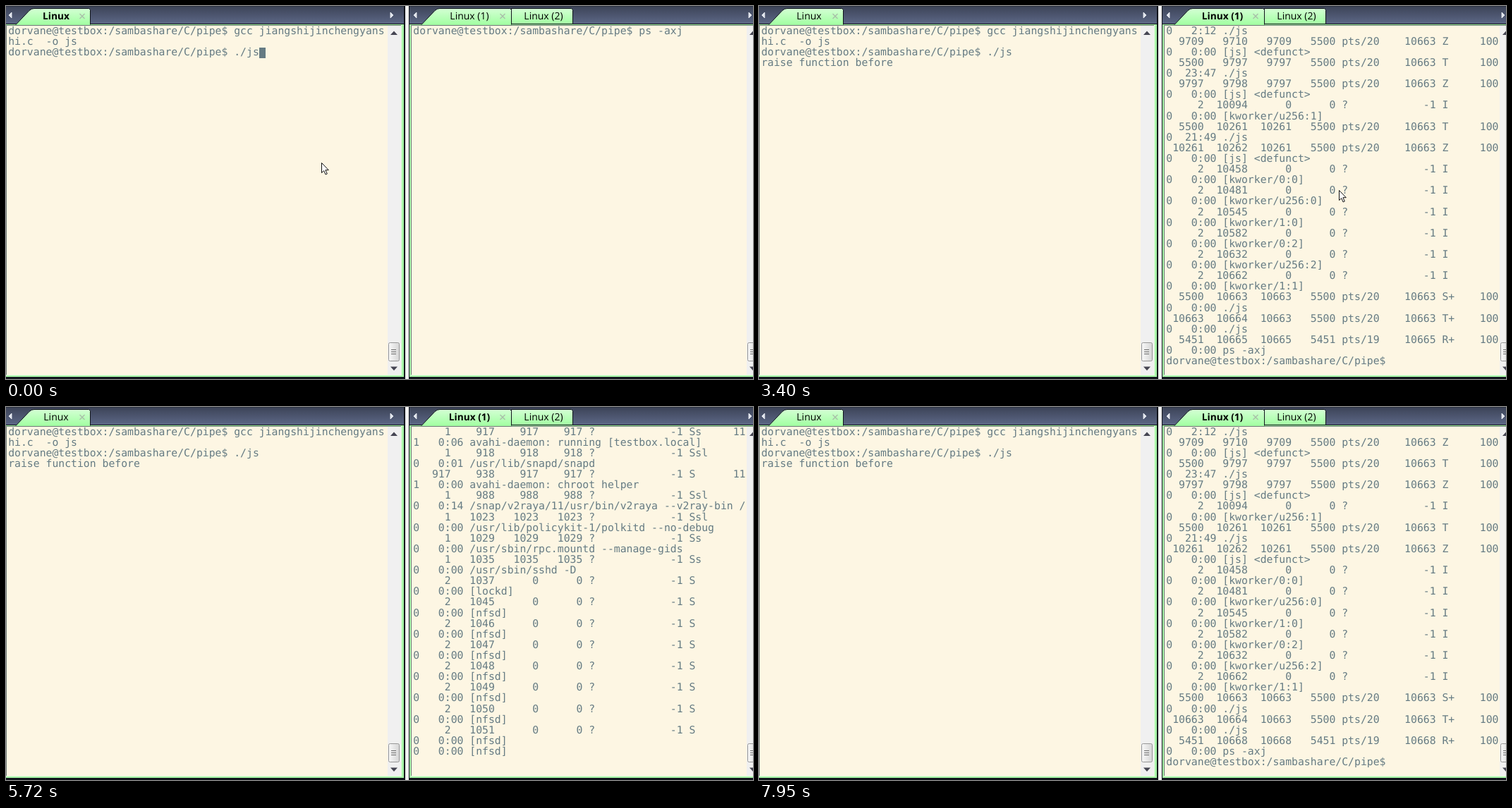
Animation of 1059 by 529 pixels, one loop 8 s. Source, as an HTML page:

```html
<!DOCTYPE html>
<html lang="en">
<head>
<meta charset="utf-8">
<title>Two terminals</title>
<style>
  html, body { margin: 0; width: 1059px; height: 529px; overflow: hidden; background: #f0f0f0; }
  body { position: relative; }
  svg, pre, #caret { position: absolute; margin: 0; }
  svg { left: 0; top: 0; }
  pre {
    top: 27.7px; color: #657b83; white-space: pre;
    font: 14.78px/15.11px "DejaVu Sans Mono", monospace;
    font-variant-ligatures: none; text-rendering: geometricPrecision;
  }
  #left { left: 3.2px; }
  #right { left: 577.3px; }
  #caret { width: 9px; height: 15px; background: #657b83; }
  svg text { font: 14px "Open Sans", sans-serif; text-anchor: middle; text-rendering: geometricPrecision; }
  svg text.on { font-weight: 700; font-size: 13.7px; }
</style>
</head>
<body>
<svg id="frame" width="1059" height="529"></svg>
<pre id="left"></pre>
<pre id="right"></pre>
<div id="caret"></div>
<svg width="1059" height="529">
  <path id="mouse" d="M.5.5V14.6L3.7 11.6 6.1 17 8.3 16 5.9 10.7H10.3Z" fill="#fff" stroke="#111" stroke-linejoin="round"/>
</svg>
<script>
const $ = id => document.getElementById(id);
const LOOP = 8000, CELL = 8.9, ROW = 15.11;

// Window chrome
const rect = (x, y, w, h, fill, more = '') =>
  `<rect x="${x}" y="${y}" width="${w}" height="${h}" fill="${fill}" ${more}/>`;
const path = (d, more) => `<path d="${d}" ${more}/>`;
const tab = d => path(d, 'fill="url(#tab)" stroke="#10141c"');
const slantTab = (x, right) =>
  tab(`M${x} 26.5L${x + 19} 6.5Q${x + 22} 3.5 ${x + 26} 3.5H${right - 2}L${right} 5.5V26.5`);
const cross = x => path(`M${x - 3.5} 11l7 7m0-7l-7 7`, 'stroke="#a9bda9" stroke-width="1.4" fill="none"');
const nav = (x, dir) => path(`M${x} 13l${-4 * dir}-4v8z`, 'fill="#dfe3ec" stroke="#f4f6fa" stroke-width=".8"');
const label = (id, x, text) => `<text id="${id}" x="${x}" y="19">${text}</text>`;

function scrollbar(x) {
  const grip = [487.5, 490.5, 493.5].map(y => rect(x + 5, y - .5, 7, 1, '#6c6c6c')).join('');
  return rect(x, 28, 19, 495, '#f0f0f0') +
    path(`M${x + 4} 41l5-5.5 5 5.5zM${x + 4} 511.5l5 5.5 5-5.5z`, 'fill="#454552"') +
    rect(x + 1.5, 477.5, 15, 26, 'url(#thumb)', 'rx="2" stroke="#979797"') + grip;
}

// Title bar, green frame and a sunken text area
function pane(x, w, textX, textW) {
  return rect(x, 0, w, 26, 'url(#bar)') + rect(x, 0, w, 1, '#2b3140') +
    rect(x, 25, w, 1, '#10141c') + rect(x, 26, w, 500, '#a8f5a8') +
    rect(x, 526, w, 3, '#10141c') +
    rect(textX - 1, 27, textW + 2, 497, '#e6fbe0') +
    rect(textX - 1, 27, textW + 1, 496, '#6f7a76') +
    rect(textX, 28, textW, 495, '#fdf6e3');
}

const gradient = (id, from, to, dir = 'x2="0" y2="1"') =>
  `<linearGradient id="${id}" ${dir}><stop stop-color="${from}"/><stop offset="1" stop-color="${to}"/></linearGradient>`;

$('frame').innerHTML =
  '<defs>' + gradient('bar', '#3c4357', '#5d6887') + gradient('tab', '#d4ffd4', '#a2ffa2') +
  gradient('thumb', '#f8f8f8', '#d6d6d6', '') + '</defs>' +
  rect(0, 0, 1059, 529, '#f0f0f0') +
  pane(0, 564, 1, 559) + rect(564, 0, 2, 529, '#10141c') + scrollbar(541) +
  slantTab(14, 119.5) + cross(108) +
  nav(4, -1) + nav(549, 1) + label('tabL', 71, 'Linux') +
  pane(571, 488, 575, 484) + rect(571, 0, 1, 529, '#10141c') + scrollbar(1050) +
  tab('M716.5 25.5V3.5H801.5L803.5 5.5V25.5Z') +
  slantTab(589, 716.5) + cross(704) +
  nav(578, -1) + nav(1057, 1) + label('tabR', 657, 'Linux (1)') + label('tab2', 762, 'Linux (2)');

// Process listing, wrapped at 53 columns
function entry(line) {
  const [ppid, pid, pgid, sid, tty, tpgid, stat, uid, time, ...cmd] = line.split(' ');
  const row = ppid.padStart(6) + [pid, pgid, sid].map(s => s.padStart(7)).join('') +
    ' ' + tty.padEnd(8) + tpgid.padStart(7) + ' ' + stat.padEnd(4) + uid.padStart(6) +
    time.padStart(7) + ' ' + cmd.join(' ');
  return row.slice(0, 53) + '\n' + row.slice(53);
}
const daemon = (ppid, pid, stat, uid, rest, group = pid) =>
  entry(`${ppid} ${pid} ${group} ${group} ? -1 ${stat} ${uid} ${rest}`);
const kernel = (pid, stat, name) => daemon(2, pid, stat, 0, `0:00 [${name}]`, 0);
const worker = (pid, name) => kernel(pid, 'I', 'kworker/' + name);
const job = (ppid, pid, pgid, stat, rest) =>
  entry(`${ppid} ${pid} ${pgid} 5500 pts/20 10663 ${stat} 1000 ${rest}`);
const zombie = (ppid, pid) => job(ppid, pid, ppid, 'Z', '0:00 [js] <defunct>');

const prompt = 'dorvane@testbox:/sambashare/C/pipe$ ';
const ps = 'ps -axj';

const started = `${prompt}gcc jiangshijinchengyans\nhi.c  -o js\n${prompt}./js`;
const running = started + '\nraise function before';

const rolling = [
  daemon(1, 917, 'Ss', 111, '0:06 avahi-daemon: running [testbox.local]'),
  daemon(1, 918, 'Ssl', 0, '0:01 /usr/lib/snapd/snapd'),
  daemon(917, 938, 'S', 111, '0:00 avahi-daemon: chroot helper', 917),
  daemon(1, 988, 'Ssl', 0, '0:14 /snap/v2raya/11/usr/bin/v2raya --v2ray-bin /'),
  daemon(1, 1023, 'Ssl', 0, '0:00 /usr/lib/policykit-1/polkitd --no-debug'),
  daemon(1, 1029, 'Ss', 0, '0:00 /usr/sbin/rpc.mountd --manage-gids'),
  daemon(1, 1035, 'Ss', 0, '0:00 /usr/sbin/sshd -D'),
  kernel(1037, 'S', 'lockd'),
  ...Array.from({ length: 7 }, (_, i) => kernel(1045 + i, 'S', 'nfsd')),
  '0   0:00 [nfsd]'
].join('\n');

const listing = pid => [
  '0   2:12 ./js',
  zombie(9709, 9710),
  job(5500, 9797, 9797, 'T', '23:47 ./js'),
  zombie(9797, 9798),
  worker(10094, 'u256:1'),
  job(5500, 10261, 10261, 'T', '21:49 ./js'),
  zombie(10261, 10262),
  worker(10458, '0:0'),
  worker(10481, 'u256:0'),
  worker(10545, '1:0'),
  worker(10582, '0:2'),
  worker(10632, 'u256:2'),
  worker(10662, '1:1'),
  job(5500, 10663, 10663, 'S+', '0:00 ./js'),
  job(10663, 10664, 10663, 'T+', '0:00 ./js'),
  entry(`5451 ${pid} ${pid} 5451 pts/19 ${pid} R+ 1000 0:00 ${ps}`),
  prompt
].join('\n');

// Each step changes part of the state; caret is [pane x, column, row]
const LX = 3.2, RX = 577.3;
const atStart = [LX, 40, 2], atPrompt = [RX, 36, 31], atEnd = [RX, 43, 31];
const steps = [
  [0, { left: started, right: prompt + ps, focus: 'L', caret: atStart, mouse: [447, 222] }],
  [200, { caret: null }],
  [720, { caret: atStart }],
  [1200, { caret: null, mouse: null }],
  [1330, { left: running }],
  [1530, { mouse: [485, 230] }],
  [1600, { mouse: [560, 240] }],
  [1670, { mouse: [652, 248] }],
  [1740, { mouse: [735, 252] }],
  [1810, { mouse: [792, 252], caret: [LX, 0, 4] }],
  [1880, { mouse: [817, 250] }],
  [1950, { focus: 'R', caret: [RX, 43, 0] }],
  [2210, { right: rolling, caret: null, mouse: null }],
  [2280, { right: listing(10665) }],
  [2740, { mouse: [817, 250] }],
  [2810, { mouse: [822, 261], caret: atPrompt }],
  [3400, { caret: null }],
  [3860, { right: listing(10665) + ps, mouse: null }],
  [3930, { caret: atEnd }],
  [4460, { caret: null }],
  [4860, { right: rolling }],
  [4920, { right: listing(10666) }],
  [4990, { caret: atPrompt }],
  [5320, { right: listing(10666) + ps, caret: atEnd }],
  [5520, { caret: null }],
  [5720, { right: rolling }],
  [5800, { right: listing(10667) }],
  [6000, { caret: atPrompt }],
  [6280, { right: listing(10667) + ps, caret: atEnd }],
  [6550, { caret: null }],
  [7080, { caret: atEnd }],
  [7610, { caret: null }],
  [7880, { right: rolling }],
  [7950, { right: listing(10668) }]
];
let state = {};
const states = steps.map(([at, change]) => state = { ...state, ...change, at });

function show({ left, right, focus, caret, mouse }) {
  $('left').textContent = left;
  $('right').textContent = right;
  $('tabL').classList.toggle('on', focus === 'L');
  $('tabR').classList.toggle('on', focus === 'R');
  $('caret').style.display = caret ? 'block' : 'none';
  if (caret) {
    const [x, col, row] = caret;
    $('caret').style.left = Math.round(x + col * CELL) + 'px';
    $('caret').style.top = Math.round(28.6 + row * ROW) + 'px';
  }
  $('mouse').style.display = mouse ? 'inline' : 'none';
  if (mouse) $('mouse').setAttribute('transform', `translate(${mouse})`);
}

let shown;
function tick() {
  const t = performance.now() % LOOP;
  const now = states.findLast(s => s.at <= t);
  if (now !== shown) show(shown = now);
  requestAnimationFrame(tick);
}
tick();
</script>
</body>
</html>
```
